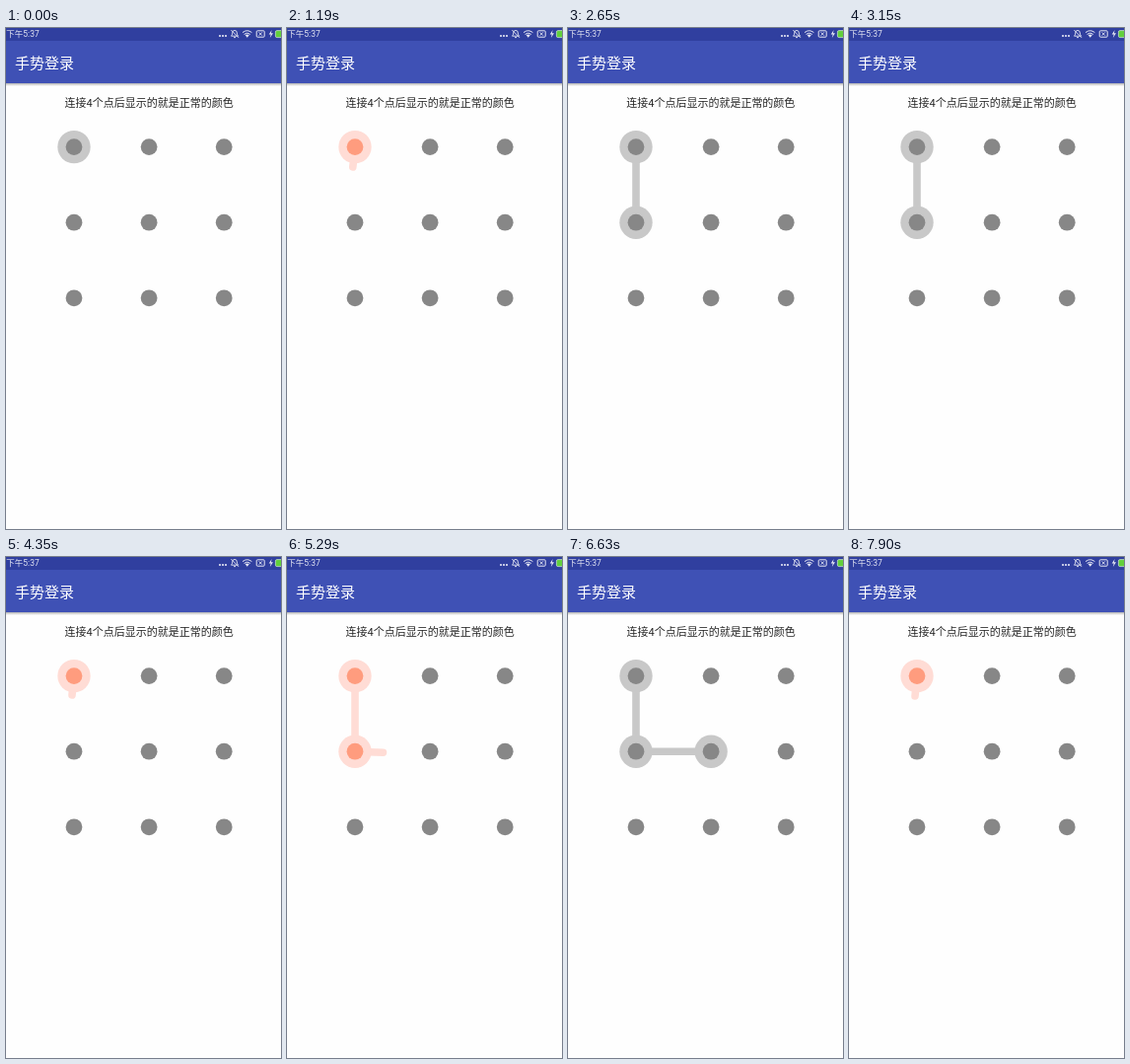
Animation, 279 px wide and 508 px high, one loop 8 s. Source, as an HTML page:

```html
<!DOCTYPE html>
<html lang="zh-CN">
<head>
<meta charset="utf-8">
<style>
html, body { margin: 0; width: 100%; height: 100%; overflow: hidden; background: #fefefe; }
svg { display: block; width: 279px; height: 508px; }
text { font-family: Roboto, "Noto Sans CJK SC", "Noto Sans CJK", sans-serif; }
</style>
</head>
<body>
<svg viewBox="0 0 279 508">
  <defs>
    <linearGradient id="shade" x1="0" y1="0" x2="0" y2="1">
      <stop offset="0" stop-color="#000" stop-opacity=".3"/>
      <stop offset="1" stop-color="#000" stop-opacity="0"/>
    </linearGradient>
  </defs>
  <rect width="279" height="508" fill="#fefefe"/>
  <rect y="56" width="279" height="3" fill="url(#shade)"/>
  <rect width="279" height="56" fill="#3f51b5"/>
  <rect width="279" height="13" fill="#303f9f"/>
  <text x="0.3" y="9.2" font-size="8.5" fill="#e4e6f3">下午5:37</text>
  <text x="9" y="41" font-size="15" fill="#fff">手势登录</text>

  <g fill="none" stroke="#e4e6f3" stroke-width="1">
    <g fill="#e4e6f3" stroke="none">
      <circle cx="217" cy="8" r="1.1"/><circle cx="220" cy="8" r="1.1"/><circle cx="223" cy="8" r="1.1"/>
    </g>
    <path d="M228.5 8.2H235.5Q234.3 7 234.3 5Q234.3 2.4 232 2.4T229.7 5Q229.7 7 228.5 8.2M231 9.6H233M228.3 2L236 9.8" stroke-width=".9"/>
    <path d="M240 4.6Q244.7 .8 249.4 4.6M241.6 6.4Q244.7 3.9 247.8 6.4"/>
    <path d="M242.7 7.3Q244.7 5.8 246.7 7.3L244.7 9.8Z" fill="#e4e6f3" stroke="none"/>
    <rect x="254.2" y="2.8" width="8" height="6.4" rx="1"/>
    <path d="M256.6 4.4L259.8 7.6M259.8 4.4L256.6 7.6" stroke-width=".9"/>
    <path d="M269.6 2L266.7 6.5H268.7L267.8 10L271 5.3H268.9Z" fill="#e4e6f3" stroke="none"/>
  </g>
  <rect x="273.4" y="2.6" width="9" height="7" rx="1.5" fill="#62d03c" stroke="#d6e6dc" stroke-width=".7"/>

  <text id="hint" x="59.6" y="79.5" font-size="11" fill="#262626">连接4个点后显示的就是正常的颜色</text>
  <path id="line" fill="none" stroke-width="7.6" stroke-linecap="round" stroke-linejoin="round"/>
  <g id="rings"></g>
  <g id="dots"></g>
</svg>
<script>
const LOOP = 8000;
const IDLE = '#878787';
const GRAY = { dot: IDLE, ring: '#c8c8c8' };
const CORAL = { dot: '#ff9c7e', ring: '#ffdcd5' };
const nodes = Array.from({ length: 9 }, (_, i) => [69 + i % 3 * 76.1, 120.6 + Math.floor(i / 3) * 76.6]);

// [time, connected nodes, palette, finger position]
const strokes = [
  [0, [0], GRAY],
  [920, [0], CORAL],
  [1070, [0], CORAL, [67, 137]],
  [1190, [0], CORAL, [66.8, 141]],
  [1310, [0], CORAL, [66.5, 146]],
  [1430, [0], CORAL, [66.3, 152]],
  [1550, [0], CORAL, [66.2, 158]],
  [1700, [0], CORAL, [66.2, 166]],
  [1850, [0], CORAL, [66.4, 174]],
  [1970, [0, 3], CORAL],
  [2650, [0, 3], GRAY],
  [4100, [0], CORAL],
  [4350, [0], CORAL, [67, 140]],
  [4500, [0], CORAL, [67, 151]],
  [4620, [0], CORAL, [67, 163]],
  [4780, [0, 3], CORAL, [67, 178]],
  [4920, [0, 3], CORAL],
  [5290, [0, 3], CORAL, [97.5, 198.2]],
  [5410, [0, 3], CORAL, [116, 196.2]],
  [5560, [0, 3, 4], CORAL],
  [5810, [0, 3, 4], GRAY],
  [7470, [0], CORAL],
  [7900, [0], CORAL, [67, 141]]
];

// [time, hint offset]
const shakes = [
  [0, 0],
  [2650, -.4], [2790, -4], [2910, 1], [3030, -2], [3150, 0],
  [5810, -.4], [5950, -4], [6075, 2], [6200, 3], [6350, 1], [6480, -3], [6630, 0]
];

const $ = id => document.getElementById(id);
const hint = $('hint'), line = $('line');

function circles(parent, r) {
  return nodes.map(([x, y]) => {
    const c = document.createElementNS('http://www.w3.org/2000/svg', 'circle');
    c.setAttribute('cx', x);
    c.setAttribute('cy', y);
    c.setAttribute('r', r);
    return parent.appendChild(c);
  });
}
const rings = circles($('rings'), 16.7);
const dots = circles($('dots'), 8.4);

const at = (steps, t) => steps.findLast(s => s[0] <= t);

function draw(t) {
  const [, path, color, finger] = at(strokes, t);
  const points = path.map(i => nodes[i]);
  if (finger) points.push(finger);
  line.setAttribute('d', 'M' + points.join('L'));
  line.setAttribute('stroke', color.ring);
  nodes.forEach((_, i) => {
    const on = path.includes(i);
    rings[i].setAttribute('fill', on ? color.ring : 'none');
    dots[i].setAttribute('fill', on ? color.dot : IDLE);
  });
  hint.setAttribute('transform', `translate(${at(shakes, t)[1]} 0)`);
}

const start = performance.now();
function tick() {
  draw((performance.now() - start) % LOOP);
  requestAnimationFrame(tick);
}
tick();
</script>
</body>
</html>
```
